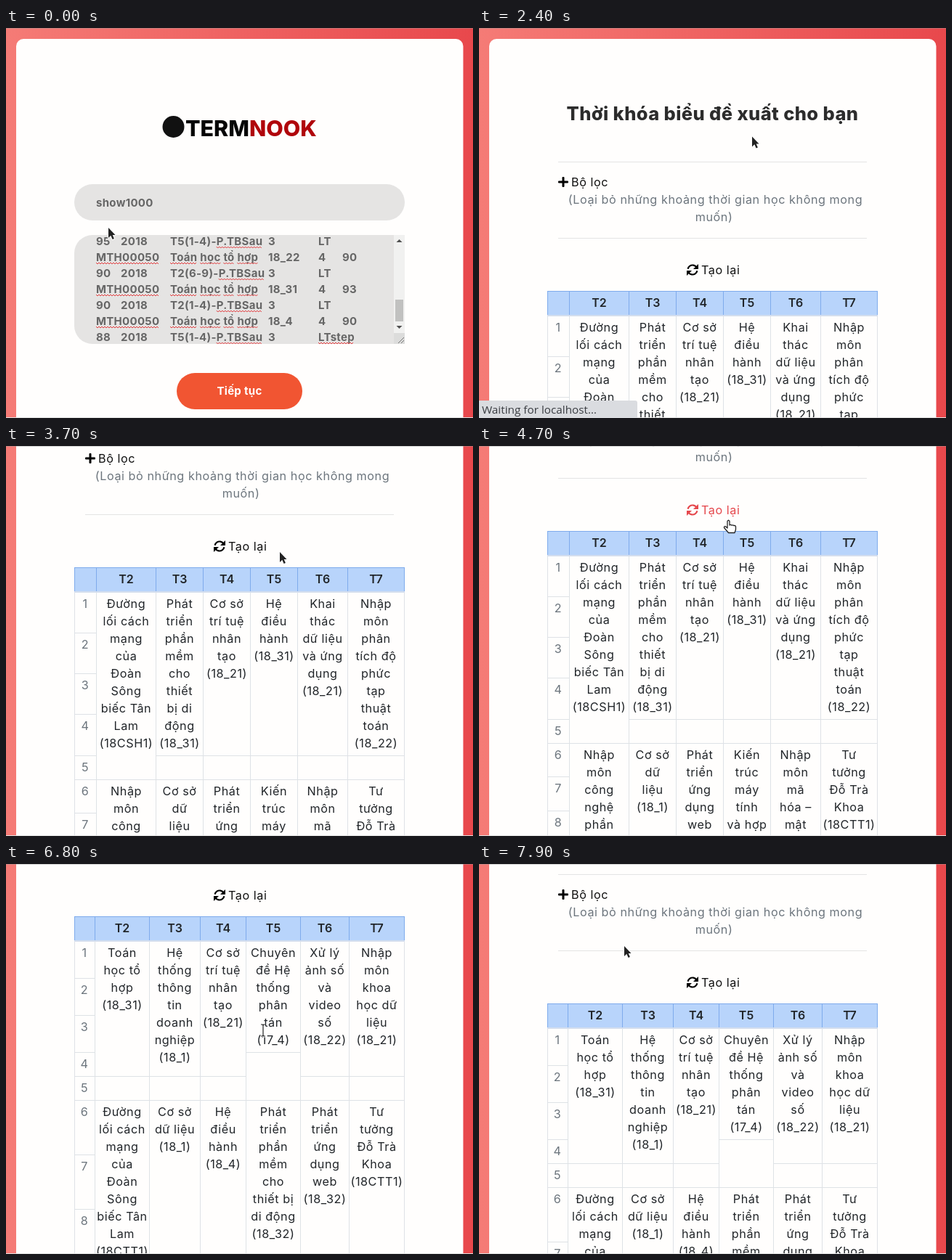
These frames come from a looping animation (643 px wide and 537 px high, 8 s). An HTML page with a canvas:

```html
<!DOCTYPE html>
<html lang="vi">
<head>
<meta charset="utf-8">
<style>
html, body { margin: 0; width: 100%; height: 100%; overflow: hidden; background: #fffefd; }
canvas { display: block; width: 643px; height: 537px; }
</style>
</head>
<body>
<canvas id="stage"></canvas>
<script>
const W = 643, H = 537, LOOP = 8000, TICK = 100;
const canvas = document.getElementById('stage');
const ctx = canvas.getContext('2d');
const dpr = window.devicePixelRatio || 1;
canvas.width = W * dpr;
canvas.height = H * dpr;

const SANS = 'Inter, "Open Sans", sans-serif';
const STYLES = {
  body: { weight: 400, size: 16.2, track: 0.55 },
  head: { weight: 600, size: 16, track: 0 },
  title: { weight: 800, size: 25.5, track: 0.4 },
  form: { weight: 700, size: 15, track: 0.3 },
  brand: { weight: 800, size: 30.4, track: 0 },
  status: { weight: 400, size: 15.3, track: 0, family: '"Open Sans", sans-serif' }
};
const INK = '#212529', MUTED = '#6c757d', LINE = '#dee2e6', RED = '#e5484d';

// Time, x, y, shape
const CURSOR = [
  [0, 141, 275, 'arrow'], [400, 141, 275, 'arrow'], [500, 128, 293, 'beam'],
  [700, 105, 345, 'beam'], [900, 150, 445, 'arrow'], [1000, 240, 482, 'hand'],
  [1200, 322, 501, 'hand'], [2200, 322, 501, 'hand'], [2300, 360, 240, 'arrow'],
  [2400, 376, 149.5, 'arrow'], [3200, 376, 149.5, 'arrow'], [3400, 377, 146, 'arrow'],
  [4100, 377, 146, 'arrow'], [4200, 358, 122, 'arrow'], [4300, 342, 102, 'hand'],
  [4700, 342, 102, 'hand'], [5000, 338, 84, 'hand'], [5800, 338, 84, 'hand'],
  [5900, 348, 155, 'arrow'], [6300, 354, 229, 'beam'], [7600, 354, 229, 'beam'],
  [7700, 359, 237, 'beam'], [7800, 359, 237, 'beam'], [7900, 200, 113, 'arrow']
];
const SCROLL = [
  [0, 0], [3200, 0], [3300, 22], [3400, 66], [3600, 155], [3800, 235], [3900, 245],
  [5800, 245], [5900, 0], [6500, 0], [6600, 50], [6700, 170], [6800, 290], [6900, 328],
  [7000, 330], [7100, 310], [7200, 265], [7300, 220], [7400, 185], [7500, 170]
];

const POLICY = 'Đường/lối cách/mạng/của/Đoàn/Sông/biếc Tân/Lam/';
const THOUGHT = 'Tư/tưởng/Đỗ Trà/Khoa/(18CTT1)';
const AI = 'Cơ sở/trí tuệ/nhân/tạo/(18_21)';

// Each column holds [row span, text] cells
const TABLES = [
  {
    x: [94, 124, 206, 271, 336, 401, 470, 548],
    y: [396, 452, 508, 564, 621, 654, 700, 747, 793, 840],
    cols: [
      [[5, POLICY + '(18CSH1)'], [4, 'Nhập/môn/công/nghệ/phần/mềm']],
      [[4, 'Phát/triển/phần/mềm/cho/thiết/bị di/động/(18_31)'], [1, ''], [4, 'Cơ sở/dữ/liệu/(18_1)']],
      [[4, AI], [1, ''], [4, 'Phát/triển/ứng/dụng/web/(18_32)']],
      [[4, 'Hệ/điều/hành/(18_31)'], [1, ''], [4, 'Kiến/trúc/máy/tính/và hợp/ngữ']],
      [[4, 'Khai/thác/dữ liệu/và ứng/dụng/(18_21)'], [1, ''], [4, 'Nhập/môn/mã/hóa –/mật/mã']],
      [[4, 'Nhập/môn/phân/tích độ/phức/tạp/thuật/toán/(18_22)'], [1, ''], [4, THOUGHT]]
    ]
  },
  {
    x: [94, 122, 197, 267, 330, 405, 472, 548],
    y: [396, 447, 498, 549, 582, 615, 690, 765, 840, 915],
    cols: [
      [[4, 'Toán/học tổ/hợp/(18_31)'], [1, ''], [4, POLICY + '(18CTT1)']],
      [[4, 'Hệ/thống/thông/tin/doanh/nghiệp/(18_1)'], [1, ''], [4, 'Cơ sở/dữ liệu/(18_1)']],
      [[4, AI], [1, ''], [4, 'Hệ/điều/hành/(18_4)']],
      [[3, 'Chuyên/đề Hệ/thống/phân/tán/(17_4)'], [2, ''],
        [4, 'Phát/triển/phần/mềm/cho/thiết bị/di động/(18_32)']],
      [[4, 'Xử lý/ảnh số/và/video/số/(18_22)'], [1, ''], [4, 'Phát/triển/ứng/dụng/web/(18_32)']],
      [[4, 'Nhập/môn/khoa/học dữ/liệu/(18_21)'], [1, ''], [4, THOUGHT]]
    ]
  }
];

function sample(keys, t, i) {
  let n = keys.length - 1;
  while (n > 0 && keys[n][0] > t) n--;
  const a = keys[n], b = keys[n + 1];
  if (!b) return a[i];
  return a[i] + (b[i] - a[i]) * (t - a[0]) / (b[0] - a[0]);
}

function setFont(style) {
  const s = STYLES[style];
  ctx.font = `${s.weight} ${s.size}px ${s.family || SANS}`;
  ctx.letterSpacing = s.track + 'px';
  return s.size;
}

// y is the middle of the capitals
function text(str, x, y, style, color, align = 'left') {
  const size = setFont(style);
  ctx.textAlign = align;
  ctx.fillStyle = color;
  ctx.fillText(str, x, y + size * 0.36);
}

function rect(x, y, w, h, color) {
  ctx.fillStyle = color;
  ctx.fillRect(x, y, w, h);
}

function round(x, y, w, h, r, color) {
  ctx.beginPath();
  ctx.roundRect(x, y, w, h, r);
  ctx.fillStyle = color;
  ctx.fill();
}

function poly(points, color) {
  ctx.beginPath();
  points.forEach(([x, y]) => ctx.lineTo(x, y));
  ctx.closePath();
  ctx.fillStyle = color;
  ctx.fill();
}

function backdrop(scroll) {
  const g = ctx.createLinearGradient(0, 0, W, 0);
  g.addColorStop(0, '#f57b76');
  g.addColorStop(1, '#e8484c');
  rect(0, 0, W, H, g);
  round(14, 15 - scroll, 615.5, 1100, 10, '#fffefd');
}

function squiggle(x, y, w) {
  ctx.beginPath();
  for (let i = 0; i <= w; i += 2) ctx.lineTo(x + i, y + (i % 4 ? 1 : -1));
  ctx.strokeStyle = '#e2383a';
  ctx.lineWidth = 1;
  ctx.stroke();
}

// Underlines the words from index `from` on
function formText(str, x, y, from = Infinity, gap = ' ') {
  text(str, x, y, 'form', '#666');
  let pos = 0;
  str.split(gap).forEach((word, i) => {
    const start = x + ctx.measureText(str.slice(0, pos)).width;
    if (i >= from) squiggle(start, y + 8, ctx.measureText(word).width);
    pos += word.length + 1;
  });
}

function infoLine(y, [seats, slot, room]) {
  formText(seats, 124, y);
  formText('2018', 158, y);
  formText(slot, 226, y, 2, '-');
  formText('3', 361, y);
  formText(room, 430, y, room === 'LT' ? 1 : 0);
}

function courseLine(y, [group, seats]) {
  formText('MTH00050', 124, y, 0);
  formText('Toán học tổ hợp', 226, y, 0);
  formText(group, 361, y);
  formText('4', 430, y);
  formText(seats, 463, y);
}

function textArea() {
  ctx.save();
  ctx.beginPath();
  ctx.roundRect(94, 285, 455, 150, [25, 0, 0, 25]);
  ctx.clip();
  rect(94, 285, 455, 150, '#e5e4e3');
  const late = 'T5(1-4)-P.TBSau';
  [['95', late, 'LT'], ['90', 'T2(6-9)-P.TBSau', 'LT'],
    ['90', 'T2(1-4)-P.TBSau', 'LT'], ['88', late, 'LTstep']]
    .forEach((row, i) => infoLine(294 + i * 44, row));
  [['18_22', '90'], ['18_31', '93'], ['18_4', '90']]
    .forEach((row, i) => courseLine(316 + i * 44, row));

  rect(534, 285, 15, 135, '#f1f1f0');
  rect(536, 374, 11, 30, '#c1c1c0');
  poly([[537.5, 295], [541.5, 291], [545.5, 295]], '#505050');
  poly([[537.5, 410], [541.5, 414], [545.5, 410]], '#505050');
  rect(534, 420, 15, 15, '#dcdcdb');
  ctx.beginPath();
  for (const d of [8, 4]) {
    ctx.moveTo(548 - d, 434);
    ctx.lineTo(548, 434 - d);
  }
  ctx.strokeStyle = '#777';
  ctx.lineWidth = 1;
  ctx.stroke();
  ctx.restore();
}

function formPage(t) {
  backdrop(0);
  ctx.beginPath();
  ctx.arc(230.5, 136, 15, 0, Math.PI * 2);
  ctx.fillStyle = '#111';
  ctx.fill();
  text('TERM', 247, 138, 'brand', '#050505');
  text('NOOK', 247 + ctx.measureText('TERM').width, 138, 'brand', '#b0050b');
  round(94, 215, 455, 50, 25, '#e5e4e3');
  formText('show1000', 124, 241);
  textArea();
  const color = t < 1000 ? '#f15532' : t < 1500 ? '#ee4c28' : '#ec4a26';
  round(235, 475, 173, 50, 25, color);
  text('Tiếp tục', 321.5, 500, 'form', '#fff', 'center');
}

function syncIcon(x, y, color) {
  ctx.save();
  ctx.translate(x, y);
  ctx.strokeStyle = color;
  ctx.lineWidth = 2.2;
  for (let i = 0; i < 2; i++) {
    ctx.beginPath();
    ctx.arc(0, 0, 6.5, Math.PI * 1.06, Math.PI * 1.8);
    ctx.stroke();
    poly([[8, -8], [8, -1], [1, -1]], color);
    ctx.rotate(Math.PI);
  }
  ctx.restore();
}

function box(x, y, w, h, color) {
  ctx.strokeStyle = color;
  ctx.lineWidth = 1;
  ctx.strokeRect(x + 0.5, y + 0.5, w, h);
}

function table({ x, y, cols }) {
  for (let r = 0; r < y.length - 1; r++) {
    box(x[0], y[r], x[1] - x[0], y[r + 1] - y[r], LINE);
    text(r + 1, (x[0] + x[1]) / 2, y[r] + 16, 'body', MUTED, 'center');
  }
  cols.forEach((cells, c) => {
    const left = x[c + 1], right = x[c + 2];
    let row = 0;
    for (const [span, label] of cells) {
      const top = y[row];
      row += span;
      box(left, top, right - left, y[row] - top, LINE);
      label.split('/').forEach((line, i) =>
        text(line, (left + right) / 2 + 0.5, top + 16 + i * 24, 'body', INK, 'center'));
    }
  });
  rect(94, 362, 455, 34, '#b8d4fb');
  for (let c = 0; c < 7; c++) {
    box(x[c], 362, x[c + 1] - x[c], 33, '#7fabec');
    if (c) text('T' + (c + 1), (x[c] + x[c + 1]) / 2 + 0.5, 378, 'head', INK, 'center');
  }
  rect(94, 395, 455, 2, '#d4deee');
}

function schedulePage(t, scroll) {
  backdrop(scroll);
  ctx.save();
  ctx.translate(0, -Math.round(scroll));
  text('Thời khóa biểu đề xuất cho bạn', 321.5, 118, 'title', '#2c2c2c', 'center');
  rect(109, 184, 425, 1, '#e4e4e4');
  rect(109, 289, 425, 1, '#e4e4e4');
  round(109, 210.5, 14, 3, 1, '#000');
  round(114.5, 205, 3, 14, 1, '#000');
  text('Bộ lọc', 127, 212, 'body', '#111');
  text('(Loại bỏ những khoảng thời gian học không mong', 325.5, 236, 'body', MUTED, 'center');
  text('muốn)', 323.5, 260, 'body', MUTED, 'center');
  const hover = t >= 4300 && t < 5900;
  syncIcon(294, 333, hover ? RED : '#000');
  text('Tạo lại', 306, 333, 'body', hover ? RED : '#111');
  table(TABLES[t < 5900 ? 0 : 1]);
  ctx.restore();
}

function statusBar(t) {
  const on = (t >= 1700 && t < 2800) || (t >= 5600 && t < 6300);
  if (!on) return;
  ctx.globalAlpha = t === 1700 || t === 2700 || t === 6200 ? 0.5 : 1;
  round(-1, 513, 219, 25, [0, 3, 0, 0], '#dadce0');
  text('Waiting for localhost…', 4, 525, 'status', '#3a3d42');
  ctx.globalAlpha = 1;
}

const SHAPES = {
  arrow: new Path2D('M0 0V14L3.3 10.8L5.6 16L7.9 15L5.7 10H9.5Z'),
  hand: new Path2D('M0 1.5Q1.5 -1 3 1.5V7Q4.5 5.8 6 7.2Q7.5 6.2 9 7.7Q11 7 11.5 9V13L10 17.5H1.5L-4.5 10.5Q-4.8 8.3 -2.5 8.8L0 11Z'),
  beam: new Path2D('M-3 -8H-1L0 -7L1 -8H3M0 -7V7M-3 8H-1L0 7L1 8H3')
};

function cursor(t) {
  const kind = CURSOR.filter(k => k[0] <= t).pop()[3];
  const shape = SHAPES[kind];
  ctx.save();
  ctx.translate(sample(CURSOR, t, 1), sample(CURSOR, t, 2));
  ctx.lineJoin = 'round';
  if (kind === 'hand') {
    ctx.fillStyle = '#fff';
    ctx.fill(shape);
    ctx.strokeStyle = '#222';
    ctx.lineWidth = 1.3;
    ctx.stroke(shape);
  } else {
    ctx.strokeStyle = '#fff';
    ctx.lineWidth = kind === 'beam' ? 3 : 2;
    ctx.stroke(shape);
    if (kind === 'beam') {
      ctx.strokeStyle = '#222';
      ctx.lineWidth = 1.2;
      ctx.stroke(shape);
    } else {
      ctx.fillStyle = '#222';
      ctx.fill(shape);
    }
  }
  ctx.restore();
}

function draw(now) {
  const t = Math.floor((now % LOOP) / TICK) * TICK;
  ctx.setTransform(dpr, 0, 0, dpr, 0, 0);
  if (t < 2300) formPage(t);
  else schedulePage(t, sample(SCROLL, t, 1));
  rect(0, 0, W, 1, 'rgba(150,150,150,.45)');
  rect(0, 536, W, 1, '#dedede');
  statusBar(t);
  cursor(t);
  requestAnimationFrame(draw);
}
requestAnimationFrame(draw);
</script>
</body>
</html>
```
